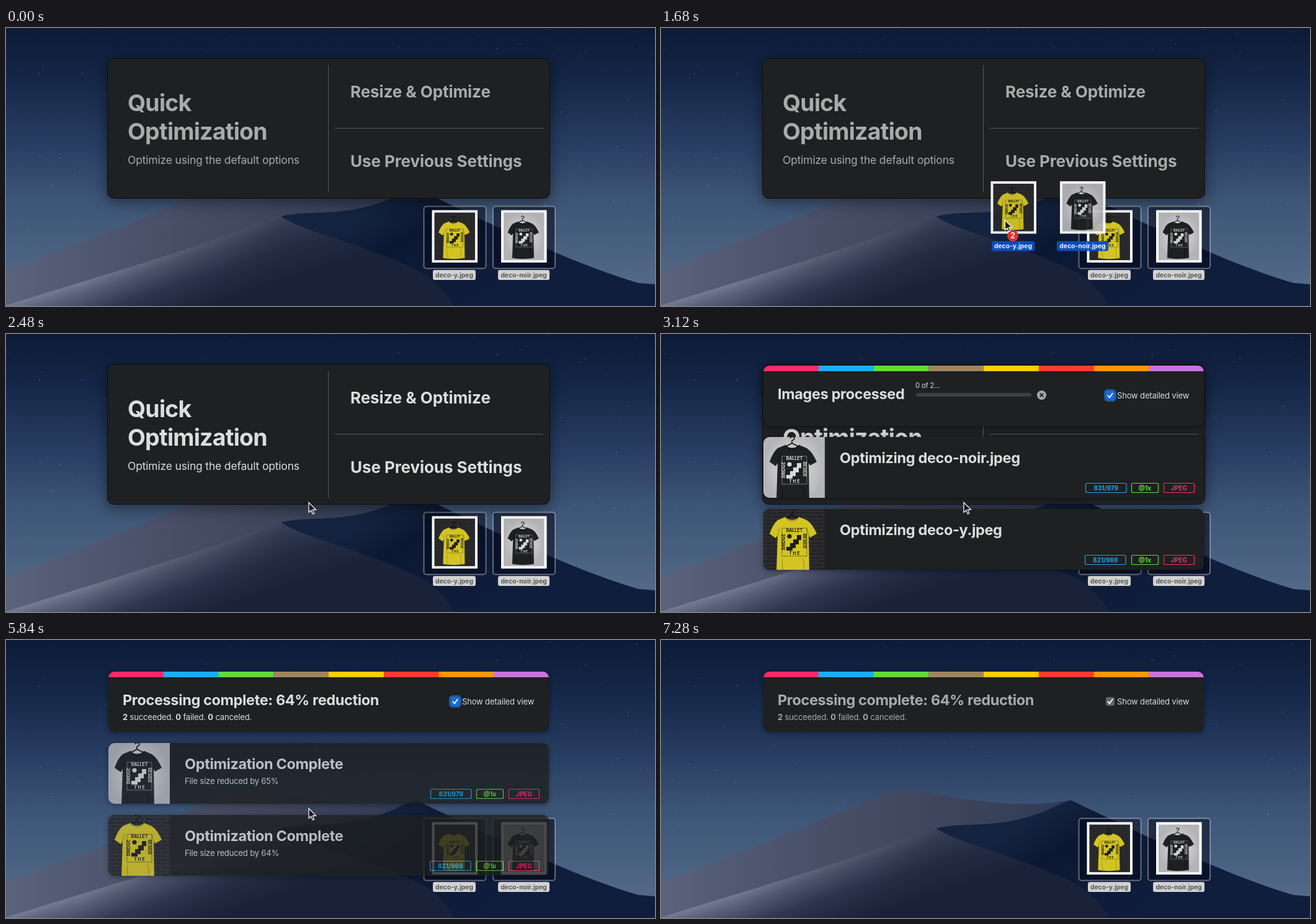
An HTML page that plays this animation: 1046 by 448 pixels, repeating every 7360 ms.

```html
<!DOCTYPE html>
<html lang="en">
<head>
<meta charset="utf-8">
<title>Image optimizer</title>
<style>
  html, body { margin: 0; width: 100%; height: 100%; overflow: hidden; background: #0c1a36; }
  svg { display: block; width: 1046px; height: 448px; font-family: Inter, "Open Sans", sans-serif; font-size: 13px; letter-spacing: -.012em; }
  text { fill: #dcdddd; }
  .dim text { fill: #a9aaaa; }
  .dim .lit { fill: #dcdddd; }
  .big { font-size: 37.5px; font-weight: 700; letter-spacing: -.021em; }
  .mid { font-size: 26px; font-weight: 700; letter-spacing: -.003em; }
  .title { font-size: 23.5px; font-weight: 700; letter-spacing: -.016em; }
  .lead { font-size: 17.5px; letter-spacing: -.01em; }
  .tag, .name { font-weight: 700; text-anchor: middle; letter-spacing: 0; }
  .tag { font-size: 10px; }
  .name { font-size: 10.3px; }
  .print { font-size: 7px; font-weight: 700; text-anchor: middle; letter-spacing: 0; }
  .b { font-weight: 700; }
  .window { filter: drop-shadow(0 2px 4px rgba(0, 0, 0, .4)); }
  #panel { filter: drop-shadow(0 5px 12px rgba(0, 0, 0, .45)); }
</style>
</head>
<body>
<script>
const LOOP = 7360, STEP = 80, DARK = '#1e2021';

function random(seed) {
  return () => (seed = seed * 16807 % 2147483647) / 2147483647;
}

const gradient = (id, coords, stops) => `<linearGradient id="${id}" gradientUnits="userSpaceOnUse" ${coords}>
  ${stops.map(([o, c]) => `<stop offset="${o}" stop-color="${c}"/>`).join('')}</linearGradient>`;

function stars() {
  const rnd = random(77);
  return Array.from({ length: 130 }, () =>
    `<circle cx="${rnd() * 1046}" cy="${rnd() ** 1.2 * 330}" r="${.35 + rnd() * .4}" opacity="${.15 + rnd() * .5}"/>`).join('');
}

// A shirt on a hanger, 99 x 117
function shirt(id, wall, cloth, fold, ink) {
  const word = (s, x, y, turn) =>
    `<text class="print" style="fill:${ink}" transform="translate(${x} ${y}) rotate(${turn})">${s}</text>`;
  return `<g id="${id}">
    <rect width="99" height="117" fill="${wall}"/>
    ${id == 'yellow' ? '<rect width="99" height="117" fill="url(#brick)"/>' : ''}
    <path d="M35 25L46 19 58 25M46 19V15Q52 12 49 9 45 7 43 11" fill="none" stroke="#111" stroke-width="1.6"/>
    <path d="M35 22Q46 31 58 22L70 27Q79 33 86 49L75 55 73 51 74 112Q46 116 21 112L23 51 20 56 10 49Q15 34 23 27Z" fill="${cloth}"/>
    <path d="M35 22Q46 35 58 22M23 51L26 39M73 51L70 39M31 90Q29 100 33 112M63 88Q67 98 64 112" fill="none" stroke="${fold}" stroke-width="1.3"/>
    ${word('BALLET', 50, 46, 0)}${word('BRIDGE', 35, 62, -90)}${word('BESIDE', 64, 61, 90)}${word('T H E', 50, 83, 0)}
    <circle cx="42" cy="53" r="3.6" fill="${ink}"/>
    <path d="M37 76V70H43V64H48V58H54V51H61V59H57V66H52V72H47V76Z" fill="${ink}"/>
    <path d="M30 40H70V85H30Z" fill="none" stroke="${ink}" stroke-width=".8" opacity=".6"/>
  </g>`;
}

function file(kind, drag) {
  const [x, w, name] = kind == 'yellow' ? [1.5, 69, 'deco-y.jpeg'] : [-5, 83, 'deco-noir.jpeg'];
  return `<g transform="translate(${kind == 'yellow' ? 686.5 : 798} 293.5)">
    ${drag ? '' : '<rect x="-13" y="-6" width="100" height="100" rx="4" fill="#050a1a" fill-opacity=".55" stroke="#fff" stroke-opacity=".36" stroke-width="2"/>'}
    <rect width="73.5" height="84.5" fill="#fff"/>
    <use href="#${kind}" transform="translate(4 4) scale(.661 .655)"/>
    <rect x="${x}" y="96.5" width="${w}" height="16" rx="3" fill="${drag ? '#0b50c4' : '#d2d2d2'}"/>
    <text class="name" x="${x + w / 2}" y="108.3" style="fill:${drag ? '#fff' : '#58595b'}">${name}</text>
  </g>`;
}

const tag = (x, w, color, s) => `<rect x="${x}" y="74.5" width="${w}" height="15" rx="2" fill="none" stroke="${color}" stroke-width="1.2"/>
  <text class="tag" x="${x + w / 2}" y="85.6" style="fill:${color}">${s}</text>`;

const card = (kind, y, size, x) => `<g class="window" transform="translate(165 ${y})"><g clip-path="url(#cardClip)">
  <rect width="710" height="98" fill="${DARK}"/>
  <svg width="99" height="98"><use href="#${kind}" y="-9"/></svg>
  <text class="title" id="${kind}Title" x="123" y="42"></text>
  <text id="${kind}Note" x="123" y="66"></text>
  ${tag(x, 65.5, '#1fa2ee', size)}${tag(593.5, 43, '#63da38', '@1x')}${tag(645.5, 49, '#ff2968', 'JPEG')}
</g></g>`;

const strip = ['#ff2968', '#1badf8', '#63da38', '#a2845e', '#ffcc00', '#ff3b30', '#ff9500', '#cc73e1']
  .map((c, i) => `<rect x="${i * 88.75}" width="89" height="9" fill="${c}"/>`).join('');

const nearDune = 'M0 447C150 400 300 357 443 304C480 330 600 355 680 400Q705 420 722 448H0Z';

document.body.innerHTML = `<svg viewBox="0 0 1046 448">
<defs>
  ${gradient('sky', 'x1="0" y1="0" x2="0" y2="420"', [[0, '#0c1a36'], [.2, '#152748'], [.45, '#283e62'], [.65, '#3c5476'], [1, '#536a88']])}
  ${gradient('far', 'x1="0" y1="0" x2="700" y2="0"', [[0, '#5a627c'], [.3, '#4b526b'], [.55, '#42485f'], [.8, '#374059'], [1, '#2b3757']])}
  ${gradient('shade', 'x1="640" y1="260" x2="760" y2="448"', [[0, '#14233f'], [.3, '#0c1832'], [1, '#101e3d']])}
  ${gradient('near', 'x1="300" y1="352" x2="331" y2="449"', [[0, '#747a91'], [.15, '#5c637c'], [.5, '#343c56'], [1, '#1a2239']])}
  <linearGradient id="dusk" gradientUnits="userSpaceOnUse" x1="120" y1="0" x2="445" y2="0">
    <stop stop-color="#1a2239" stop-opacity="0"/><stop offset="1" stop-color="#1a2239" stop-opacity=".65"/>
  </linearGradient>
  <radialGradient id="studio"><stop stop-color="#e2e2e2"/><stop offset="1" stop-color="#b4b4b6"/></radialGradient>
  <pattern id="brick" width="18" height="12" patternUnits="userSpaceOnUse">
    <path d="M0 .5H18M0 6.5H18M4 0V6M13 6V12" stroke="#3a3a3c" stroke-width=".8"/>
  </pattern>
  <clipPath id="cardClip"><rect width="710" height="98" rx="10"/></clipPath>
  ${shirt('yellow', '#252527', '#d3c424', '#a3961a', '#1d1d1c')}
  ${shirt('noir', 'url(#studio)', '#1f2021', '#101112', '#d8d8d8')}
</defs>

<rect width="1046" height="448" fill="url(#sky)"/>
<g fill="#dbe6ff">${stars()}</g>
<path d="M0 391C120 348 260 290 350 252Q385 237 425 244C480 257 560 268 620 263Q645 261 660 258L740 296V448H0Z" fill="url(#far)"/>
<path d="M660 258C630 268 600 292 520 297Q460 298 443 304C480 330 600 355 680 400Q705 420 722 448H1046V413L1020 411Q990 403 930 380C880 360 800 325 740 296Z" fill="url(#shade)"/>
<path d="${nearDune}" fill="url(#near)"/>
<path d="${nearDune}" fill="url(#dusk)"/>

${file('yellow')}${file('noir')}

<g id="panel">
  <rect x="163.5" y="49.5" width="713" height="225" rx="10" fill="${DARK}" stroke="#0d0f12"/>
  <path d="M519.5 60V264M530 161.5H866" stroke="#58595a"/>
  <text class="big" x="196" y="134">Quick</text>
  <text class="big" x="196" y="180">Optimization</text>
  <text class="lead" x="196" y="219">Optimize using the default options</text>
  <text class="mid" x="555" y="112">Resize &amp; Optimize</text>
  <text class="mid" x="555" y="224">Use Previous Settings</text>
</g>

<g id="header" class="window"><g transform="translate(165 51)" clip-path="url(#cardClip)">
  <rect width="710" height="97" rx="10" fill="${DARK}"/>${strip}
  <text class="title" id="headline" x="23" y="54"></text>
  <g id="progress">
    <text x="245" y="36" font-size="11.2" id="count"></text>
    <rect x="246" y="44" width="186" height="6" rx="3" fill="#3f4042"/>
    <rect id="bar" x="246" y="44" width="0" height="6" rx="3" fill="#1a72e8"/>
    <circle cx="448.5" cy="47.5" r="7.5" fill="#a6a7a8"/>
    <path d="M445.7 44.7L451.3 50.3M451.3 44.7L445.7 50.3" stroke="${DARK}" stroke-width="1.7"/>
  </g>
  <text id="summary" x="23" y="78"><tspan class="b">2</tspan> succeeded. <tspan class="b">0</tspan> failed. <tspan class="b">0</tspan> canceled.</text>
  <rect id="ring" x="549" y="38" width="20" height="20" rx="6" fill="#1b5d92"/>
  <rect id="box" x="552" y="41" width="14" height="14" rx="3"/>
  <path d="M555.3 48.3L558 51.3 562.8 44.6" fill="none" stroke="#fff" stroke-width="1.8" stroke-linecap="round"/>
  <text class="lit" x="570" y="53">Show detailed view</text>
</g></g>

<g id="cards">${card('noir', 166, '831/979', 519.5)}${card('yellow', 282, '821/969', 518.5)}</g>

<g id="drag">
  ${file('yellow', true)}${file('noir', true)}
  <circle cx="722" cy="381.5" r="9" fill="#f0302f"/>
  <text x="722" y="386" font-size="12.5" font-weight="700" text-anchor="middle" style="fill:#fff">2</text>
</g>
<path id="cursor" d="M0 0V16L3.7 12.6 6.2 18.5 8.7 17.4 6.2 11.7H11.5Z" fill="#161718" stroke="#fff" stroke-width="1.2"/>
</svg>`;

const el = id => document.getElementById(id);
const show = (id, opacity) => {
  el(id).style.opacity = opacity;
  el(id).style.display = opacity > 0 ? '' : 'none';
};
const move = (id, [x, y]) => el(id).setAttribute('transform', `translate(${x} ${y})`);
const say = (id, s) => { if (el(id).textContent != s) el(id).textContent = s; };
// Share of the span from a to b that has passed at t
const part = (t, a, b) => Math.min(1, Math.max(0, (t - a) / (b - a)));

// The pointer rises from below, overshoots and settles on the first file
function entry(t) {
  const rise = 1 - (1 - part(t, 120, 400)) ** 2, settle = part(t, 400, 560);
  return [738 - 35 * rise + 11 * settle, 448 - 122 * rise + 32 * settle];
}

// Offset of the dragged files, slowing towards the drop
function pull(t) {
  const rest = 1 - part(t, 1320, 2160);
  return [-226 * (1 - rest ** 2.07), -86.5 * (1 - rest ** 1.38)];
}

function draw(t) {
  const dropped = t >= 3040, done = t >= 3840, idle = t >= 7280;

  show('panel', 1 - part(t, 3040, 3360) ** 2);
  el('panel').classList.toggle('dim', t < 2240);

  show('header', dropped ? 1 : 0);
  el('header').classList.toggle('dim', idle);
  say('headline', done ? 'Processing complete: 64% reduction' : 'Images processed');
  say('count', t < 3760 ? '0 of 2...' : '1 of 2...');
  el('bar').setAttribute('width', t < 3760 ? 0 : 93);
  show('progress', done ? 0 : 1);
  show('summary', done ? 1 : 0);
  show('ring', idle ? 0 : 1);
  el('box').setAttribute('fill', idle ? '#626365' : '#1b68de');

  show('cards', dropped ? 1 - part(t, 5760, 6320) ** .85 : 0);
  const finish = (kind, name, saved, when) => {
    say(kind + 'Title', t < when ? 'Optimizing ' + name : 'Optimization Complete');
    say(kind + 'Note', t < when ? '' : `File size reduced by ${saved}%`);
  };
  finish('noir', 'deco-noir.jpeg', 65, 3760);
  finish('yellow', 'deco-y.jpeg', 64, 3840);

  // The pointer runs slightly ahead of the files it drags
  const [x, y] = entry(t), [dx, dy] = pull(t + 15);
  show('drag', t < 1360 ? 0 : .94 * (1 - part(t, 2160, 2480)));
  move('drag', pull(t));
  show('cursor', t >= 160 && !idle ? 1 : 0);
  move('cursor', [x + dx, y + dy]);
}

const start = performance.now();
function frame() {
  const t = (performance.now() - start) % LOOP;
  draw(Math.floor(t / STEP) * STEP);
  requestAnimationFrame(frame);
}
frame();
</script>
</body>
</html>
```
